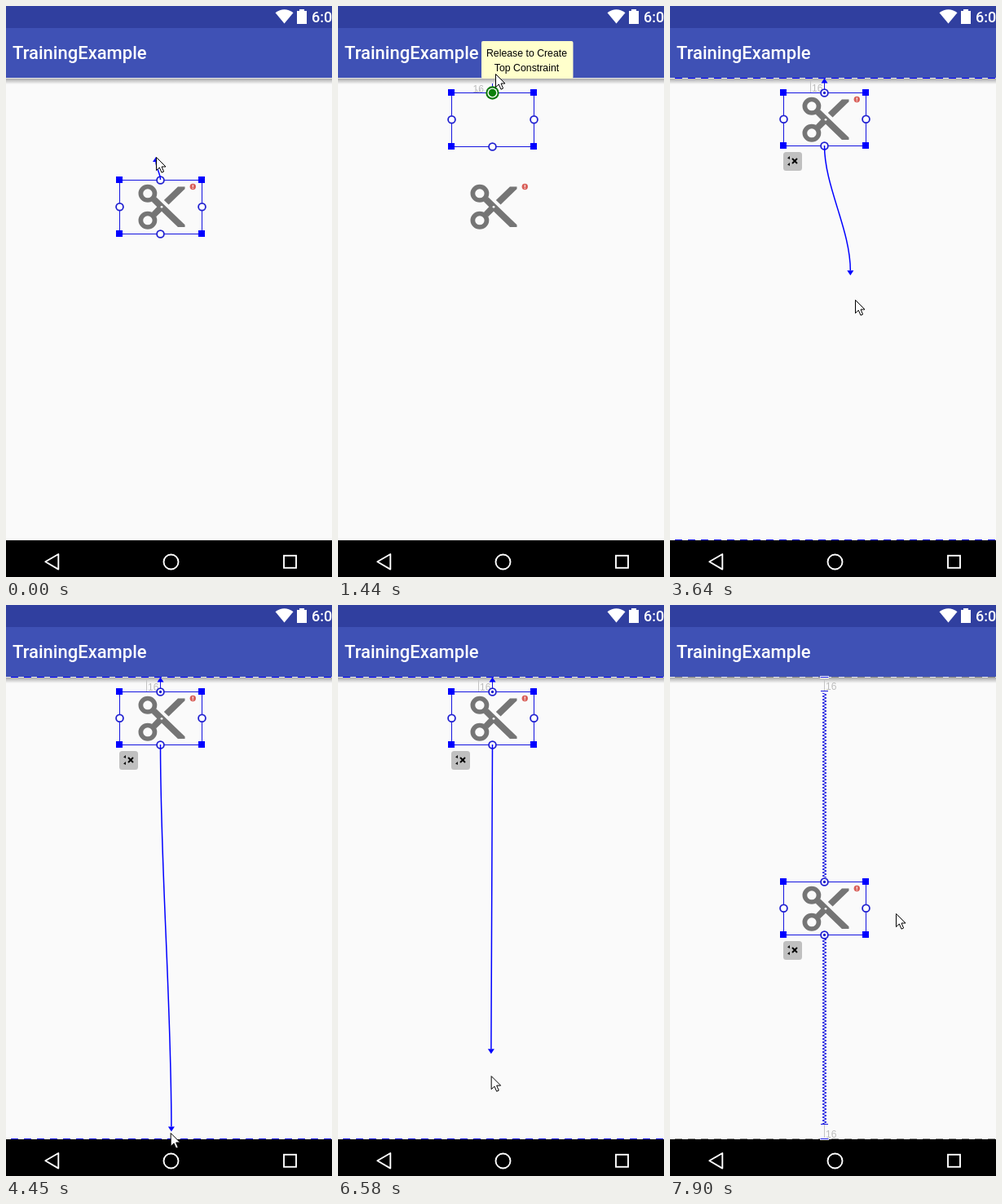
An HTML page that plays this animation: 400 by 700 pixels, repeating every 8 s.

```html
<!DOCTYPE html>
<html lang="en">
<head>
<meta charset="utf-8">
<title>Constraint editor</title>
<style>
  html, body { margin: 0; width: 100%; height: 100%; overflow: hidden; background: #fafafa; }
  svg { display: block; width: 400px; height: 700px; }
  .bar { font-family: Roboto, sans-serif; font-weight: 500; fill: #fff; }
  .tip, .dim { font-family: "Liberation Sans", Arial, sans-serif; }
  .tip { font-size: 12.3px; text-anchor: middle; fill: #000; }
  .dim { font-size: 12px; fill: #bcbcbc; }
  .thin { fill: none; stroke: #1414e0; stroke-width: 1; }
  .gray { fill: none; stroke: #c4c4c4; stroke-width: 1; }
</style>
</head>
<body>
<svg viewBox="0 0 400 700">
  <defs>
    <linearGradient id="shade" x1="0" y1="0" x2="0" y2="1">
      <stop offset="0" stop-color="#a9a9a9"/>
      <stop offset=".45" stop-color="#cfcfcf"/>
      <stop offset="1" stop-color="#fafafa"/>
    </linearGradient>
    <g id="scissors">
      <g transform="translate(156.8 .3) scale(2.85 2.75)" fill="none" stroke="#757575" stroke-width="2">
        <circle cx="6" cy="6" r="3"/>
        <circle cx="6" cy="18" r="3"/>
        <path fill="#757575" stroke="none" d="M9.64 7.64L22 20v1h-3l-7-7-2.36 2.36-1.9-1.9L10 12 7.7 9.6ZM13 9l6-6h3v1l-7 7Z"/>
        <circle cx="12" cy="12" r=".5" fill="#fafafa" stroke="none"/>
      </g>
      <circle cx="229.3" cy="8.5" r="3.7" fill="#d9605a"/>
      <path d="M229.3 6.2v2.7M229.3 9.8v1.2" stroke="#fff" stroke-width="1.1"/>
    </g>
    <g id="button">
      <rect x="139" y="73" width="23" height="23" rx="3.5" fill="#c0c0c0"/>
      <path d="M150 81l6 6M156 81l-6 6" stroke="#000" stroke-width="1.9"/>
      <path d="M147 78l-3 2.5 3 1.5ZM147 86l-3 2.5 3 1.5Z" fill="#111"/>
    </g>
    <path id="arrow" d="M.5 .5V16.6L4.3 13 7 19.2 9.6 18 7 12H12Z" fill="#fff" stroke="#000" stroke-linejoin="round"/>
  </defs>

  <rect width="400" height="700" fill="#fafafa"/>
  <rect width="400" height="27" fill="#303f9f"/>
  <rect y="27" width="400" height="61" fill="#3f51b5"/>
  <rect y="88" width="400" height="1" fill="#e6e6e8"/>
  <rect y="89" width="400" height="7" fill="url(#shade)"/>
  <path d="M330.5 8.2Q341.5 .2 352.5 8.2L341.5 21.5Z" fill="#fff"/>
  <path d="M357 6h3V4h6v2h3v16h-12Z" fill="#fff"/>
  <text class="bar" x="375" y="20" font-size="18">6:00</text>
  <text class="bar" x="8" y="65" font-size="22">TrainingExample</text>
  <rect y="655" width="400" height="45" fill="#000"/>
  <g fill="none" stroke="#fff" stroke-width="1.9">
    <path d="M48.3 681.3L64.3 672v18.6Z" stroke-linejoin="round"/>
    <circle cx="202.5" cy="681.5" r="9"/>
    <rect x="341" y="673.8" width="15" height="15"/>
  </g>
  <g id="live"></g>
</svg>
<script>
const live = document.getElementById('live');
const LOOP = 8000, STEP = 134;
const BLUE = '#0000ff', MID = 189.5;
const HOME = 213, TOP = 106, CENTER = 339, MOVE = 794;

// moments of the gesture, in ms
const SHOW = 250, AIM = 800, PIN = 1450, GRAB = 3470, REACH = 4580,
  CANCEL = 4970, REGRAB = 5890, REREACH = 6700, DONE = 7625;

// pointer stops: time, x, y
const stops = [
  [0, 184, 185], [AIM, 193, 83], [PIN, 193, 83], [2144, 141, 140], [2412, 149, 138],
  [2920, 191, 174], [3340, 192, 176], [3618, 227, 360], [4300, 205, 643], [4850, 190, 661],
  [5380, 191, 174], [REGRAB, 191, 174], [REREACH, 187, 657], [DONE, 187, 657], [7906, 277, 378]
];

const within = (t, a, b) => t >= a && t < b;
const ramp = (t, start, span) => Math.min(1, Math.max(0, (t - start) / span));
const mix = (a, b, k) => a + (b - a) * k;

function pointer(t) {
  const i = Math.max(1, stops.findIndex(s => t <= s[0]));
  const [t0, x0, y0] = stops[i - 1], [t1, x1, y1] = stops[i];
  const k = ramp(t, t0, t1 - t0);
  return [mix(x0, x1, k), mix(y0, y1, k)];
}

const use = (id, x, y) => `<use href="#${id}" x="${x}" y="${y}"/>`;
const line = (d, cls) => `<path class="${cls}" d="${d}"/>`;
const label = (x, y) => `<text class="dim" x="${x}" y="${y}">16</text>`;
const circle = (x, y, r, fill, stroke = 'none', w = 1) =>
  `<circle cx="${x}" cy="${y}" r="${r}" fill="${fill}" stroke="${stroke}" stroke-width="${w}"/>`;

const dashes = color =>
  `<path d="M6 88.5H400M6 654.5H400" stroke="${color}" stroke-dasharray="9 7"/>`;

const anchor = (x, y, linked) =>
  circle(x, y, 4.4, '#fff', '#2020d0', 1.8) + (linked ? circle(x, y, 1.7, '#2020d0') : '');

const hot = (x, y) => circle(x, y, 8.2, '#0d780d') + circle(x, y, 6.1, '#fff') + circle(x, y, 4.7, '#0b800b');

const halo = (x, y) => circle(x, y, 9.5, '#d2d2d2', '#666') + circle(x, y, 6.2, '#d2d2d2', '#666');

function outline(y, h, topLinked, bottomLinked) {
  let s = `<rect class="thin" x="139.5" y="${y + .5}" width="101" height="${h}"/>`;
  for (const x of [139, 240]) {
    for (const v of [y, y + h]) s += `<rect x="${x - 4}" y="${v - 4}" width="8" height="8" fill="${BLUE}"/>`;
    s += anchor(x + .5, y + h / 2 + .2);
  }
  return s + anchor(MID, y + .5, topLinked) + anchor(MID, y + h + .5, bottomLinked);
}

function zigzag(from, to) {
  let d = `M187 ${from}`;
  for (let y = from + 2, x = 192; y <= to; y += 2, x = 379 - x) d += `L${x} ${y}`;
  return line(d, 'thin');
}

function springs(y, h) {
  const cap = v => `<path d="M184 ${v}H195" stroke="#fff" stroke-width="3"/>` + line(`M184.5 ${v}H194.5`, 'thin');
  return cap(88.5) + cap(654.5) +
    line('M189.5 90V105M189.5 637V653', 'gray') +
    line('M185 105.5H194M185 636.5H194', 'thin') +
    zigzag(108, y - 4) + zigzag(y + h + 4, 636) +
    label(191, 104) + label(191, 653);
}

const topLink = () =>
  line('M172.5 91V106.5H187', 'gray') + label(174, 105) +
  line('M189.5 102V93', 'thin') + `<path d="M185.5 94.5L189.5 88.5L193.5 94.5Z" fill="${BLUE}"/>`;

function topGap(y) {
  const mid = (88 + y) / 2, half = Math.max(0, y - mid - 14);
  return line(`M172.5 ${y}v${-half}M172.5 90v${half}M169.5 ${y - 4}l3 4l3 -4`, 'gray') +
    label(165.5, mid + 8.5) + line(`M189.5 ${y - 11}v6`, 'thin');
}

function tooltip(y, side) {
  return `<rect x="176" y="${y - 63}" width="112.5" height="46" rx="2" fill="#ffffcc"/>` +
    `<text class="tip" x="231.5" y="${y - 44}">Release to Create</text>` +
    `<text class="tip" x="231.5" y="${y - 26}">${side} Constraint</text>`;
}

function wire(from, [x, y]) {
  const dir = Math.sign(y - from), neck = y - 6 * dir, pull = (neck - from) * .33;
  return `<path d="M189.5 ${from}C189.5 ${from + pull} ${x} ${neck - pull} ${x} ${neck}" fill="none" stroke="${BLUE}" stroke-width="1.5"/>` +
    `<path d="M${x - 4} ${neck}h8L${x} ${y}Z" fill="${BLUE}"/>`;
}

function previewUp(t) {
  const y = Math.round(mix(HOME, TOP, ramp(t, AIM + 4, 400)));
  return topGap(y) + outline(y, 66) + hot(MID, y + .5) + tooltip(y, 'Top');
}

function previewDown(t, start) {
  const y = Math.round(mix(TOP, CENTER, ramp(t, start, MOVE)));
  return springs(y, 66) + outline(y, 66, true) + hot(MID, y + 66.5) + tooltip(y + 66, 'Bottom');
}

function widget(t, y, h) {
  const pinned = t >= PIN, done = t >= DONE, tail = pointer(t - 45);
  let s = done ? springs(y, h) : pinned ? topLink() : '';
  if (within(t, 2090, 2300)) s += halo(139.5, y + h / 2);
  if (within(t, 2900, GRAB) || within(t, 5370, REGRAB)) s += halo(MID, y + h + .5);
  s += outline(y, h, pinned, done);
  if (pinned) s += use('button', 0, y);
  if (t < AIM) s += wire(y, tail);
  if (within(t, GRAB, REACH) || within(t, REGRAB, REREACH)) s += wire(y + h, tail);
  return s;
}

function scene(t) {
  const [px, py] = pointer(t);
  const pinned = t >= PIN;
  const y = t >= DONE ? CENTER : pinned ? TOP : HOME;
  const seeking = within(t, SHOW, AIM) || within(t, GRAB, CANCEL) || within(t, REGRAB, DONE);

  let s = seeking ? dashes(BLUE) : pinned ? dashes('#888') : '';
  s += use('scissors', 0, y);

  if (within(t, AIM, PIN)) s += previewUp(t);
  else if (within(t, REACH, CANCEL)) s += previewDown(t, REACH);
  else if (within(t, REREACH, DONE)) s += previewDown(t, REREACH);
  else s += widget(t, y, pinned ? 65 : 66);

  if (within(t, PIN, 2640)) s += circle(px + 14, py + 1, 6, '#fff', '#2196f3', 3.6);
  return s + use('arrow', px, py);
}

let shown = -1;
function draw(now) {
  const n = Math.floor(now % LOOP / STEP + .15);
  if (n !== shown) {
    shown = n;
    live.innerHTML = scene(Math.min(n * STEP, 7906));
  }
  requestAnimationFrame(draw);
}
draw(0);
</script>
</body>
</html>
```
